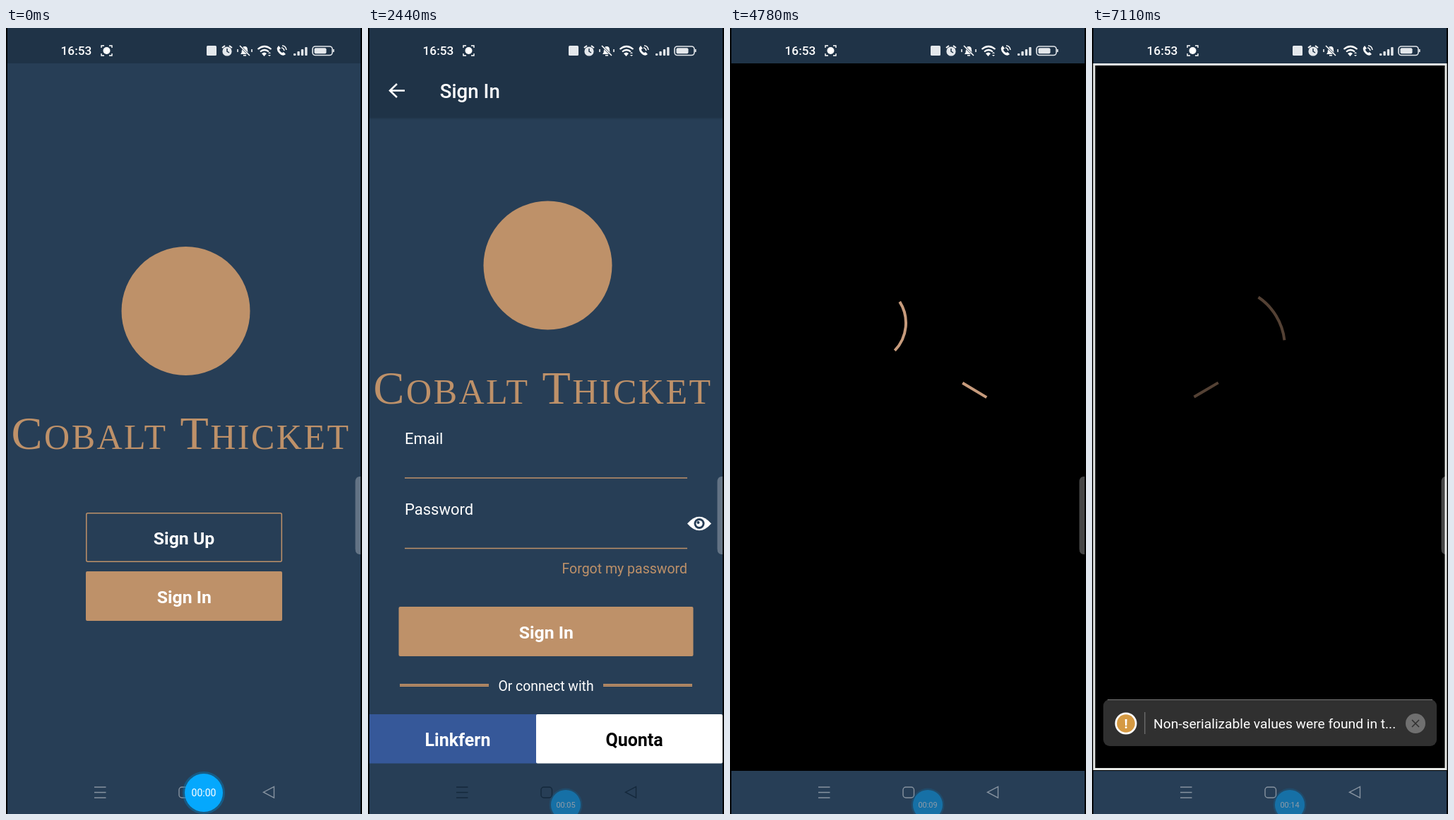
These frames come from a looping animation (504 px wide and 1111 px high, 7220 ms). An HTML page:

```html
<!DOCTYPE html>
<html lang="en">
<head>
<meta charset="utf-8">
<title>Event app</title>
<style>
  html, body { margin: 0; width: 100%; height: 100%; overflow: hidden; background: #000; }
  svg { display: block; width: 100vw; height: 100vh; font-family: Roboto, sans-serif; fill: #fff; }
  .bold { font-weight: 700; }
  .mid { text-anchor: middle; }
  .tan { fill: #be9169; }
  .line { fill: none; stroke: #be9169; }
  .white { fill: none; stroke: #fff; stroke-width: 2; }
  .book { font: 700 18px "Liberation Serif", serif; letter-spacing: .7px; }
  .brand { font: 66px "Liberation Serif", serif; letter-spacing: 2.5px; fill: #be9169; }
  .brand tspan { font-size: 50px; }
</style>
</head>
<body>
<svg id="stage" viewBox="0 0 504 1111" preserveAspectRatio="none"></svg>
<script>
const BG = '#273e56', BAR = '#1f3347', LOOP = 7220;

const rect = (x, y, w, h, fill, more = '') =>
  `<rect x="${x}" y="${y}" width="${w}" height="${h}" fill="${fill}" ${more}/>`;
const dot = (x, y, r, fill, more = '') => `<circle cx="${x}" cy="${y}" r="${r}" fill="${fill}" ${more}/>`;
const path = (d, cls = '', more = '') => `<path d="${d}" class="${cls}" ${more}/>`;
const text = (x, y, size, str, cls = '', more = '') =>
  `<text x="${x}" y="${y}" font-size="${size}" class="${cls}" ${more}>${str}</text>`;
const book = (x, y, str) => `<text x="${x}" y="${y}" class="book">${str}</text>`;
const group = (x, y, body, more = '') => `<g transform="translate(${x} ${y})" ${more}>${body}</g>`;

const brand = y => group(0, y, dot(254.5, 400, 91, '#be9169') +
  '<text x="7.5" y="595" class="brand">C<tspan>OBALT</tspan> T<tspan>HICKET</tspan></text>');

const statusBar = () => {
  const bars = [0, 1, 2, 3].map(i => rect(407 + i * 5.4, 36 - i * 3, 3.4, 3 + i * 3, '#e4e8ec', 'rx="1"')).join('');
  return text(77.5, 38, 17.3, '16:53', '', 'font-weight="500"') +
    dot(142.5, 32, 5, '#fff') +
    path('M135 28v-3h4M146 25h4v3M150 36v3h-4M139 39h-4v-3', 'white', 'style="stroke-width:1.4"') +
    rect(284, 25, 14, 14, '#e4e8ec', 'rx="1.5"') +
    dot(313, 33, 6.6, '#e4e8ec') +
    path('M313 29v4l3 2', '', `fill="none" stroke="${BAR}" stroke-width="1.5"`) +
    path('M306 28l4-3M316 25l4 3', 'white') +
    path('M332 37q2-2 2-6 0-5 4-5t4 5q0 4 2 6zM336 38h4v1.5h-4z') +
    path('M330 24l16 16', '', `stroke="${BAR}" stroke-width="3"`) +
    path('M331 25l14 14M328 30v4M348 30v4', 'white', 'style="stroke-width:1.5"') +
    path('M356.5 30q9.500-8 19 0M360 33.500q6-5 12 0', 'white', 'style="stroke-width:2.2"') +
    path('M362 36q4-3 7 0l-3.500 4zM371 36l2-2 2 2zM371 38l2 2 2-2z') +
    path('M386 25q-5 5 1 11 5 5 9 1l-3-3-2 1q-4-2-4-5l2-1z') +
    path('M390 28q3 0 4 4M391 25q5 0 6 6', 'white', 'style="stroke-width:1.5"') + bars +
    rect(434, 26, 28, 12.5, 'none', 'rx="4" stroke="#e4e8ec" stroke-width="1.6"') +
    rect(436.5, 28.3, 17, 8, '#e4e8ec', 'rx="2"') + rect(463, 30, 1.6, 4, '#e4e8ec');
};

const welcome = () => rect(2, 0, 500, 1111, BG) + rect(2, 0, 500, 50, BAR) + brand(0) +
  rect(113.8, 685.8, 276.5, 68.5, 'none', 'class="line" stroke-width="1.5" rx="2"') +
  text(252, 730, 24.8, 'Sign Up', 'bold mid') +
  rect(113, 768, 278, 70, '#be9169', 'rx="2"') +
  text(252.3, 813, 24.8, 'Sign In', 'bold mid');

const divider = 'M45 929H171M333 929H459';

const signIn = () => rect(2, 50, 500, 1061, BG) + rect(2, 50, 500, 79, '#23394f') +
  rect(2, 0, 500, 127, BAR) +
  path('M52 88.500H32M41 79l-10 9.500 10 9.500', 'white', 'style="stroke-width:2.5"') +
  text(101.8, 98.5, 27.7, 'Sign In', '', 'font-weight="500"') + brand(-64.5) +
  text(52, 588, 22, 'Email') + text(52, 688, 22, 'Password') +
  path('M52 636H452M52 735.500H452', 'line', 'stroke-width="1.6"') +
  path('M452 700.500Q469 681 486 700.500Q469 720 452 700.500Z') +
  dot(469, 700.5, 7.5, BG) + dot(469, 700.5, 4.6, '#fff') + dot(467.5, 699, 2, BG) +
  text(452, 771, 19.5, 'Forgot my password', 'tan', 'text-anchor="end"') +
  rect(43.5, 818, 417, 70, '#be9169', 'rx="2"') +
  text(252.3, 863, 24.8, 'Sign In', 'bold mid') +
  path(divider, 'line', 'stroke-width="4"') + path(divider, '', 'stroke="#8a6c55" stroke-width="1"') +
  text(252, 936.5, 19.4, 'Or connect with', 'mid') +
  rect(2, 970, 237, 69.5, '#365899') + rect(238, 970, 264, 69.5, '#fff', 'rx="2"') +
  text(127, 1015, 25, 'Linkfern', 'bold mid') +
  text(377, 1015, 25, 'Quonta', 'bold mid', 'fill="#000"');

const loader = id => rect(2, 0, 500, 50, BAR) + rect(2, 50, 500, 1000, '#000') +
  rect(2, 1050, 500, 61, BG) + `<path id="${id}" class="line" style="stroke:#c79b7c" stroke-width="4"/>`;

const warning = () =>
  rect(3, 51.5, 498, 996, 'none', 'stroke="#e9ebe9" stroke-width="3"') +
  rect(16, 949, 472, 66, '#303030', 'rx="9"') + path('M22 949.500H482', '', 'stroke="#777"') +
  dot(48, 983, 15.5, '#fff') + dot(48, 983, 12.8, '#d59a43') +
  text(48, 990, 19, '!', 'bold mid') + rect(74, 967, 1.5, 31, '#666') +
  text(87, 990, 19.2, 'Non-serializable values were found in t...') +
  dot(458, 983, 14, '#707070') +
  path('M453 978l10 10M463 978l-10 10', '', 'stroke="#303030" stroke-width="1.5"');

const icons = {
  language: path('M-10-9l9 3V10l-9-3z') +
    path('M0-7H10V8L1 6M2 4l4-9 3 9M3 1h5', 'white', 'style="stroke-width:1.7"') +
    path('M-8-2h5M-5.500-4v2q0 4-3 6M-6 0l3 4', '', 'fill="none" stroke="#182434" stroke-width="1.3"'),
  pin: path('M0 12Q-9 1-9-4A9 8 0 0 1 9-4Q9 1 0 12Z') + dot(0, -3.5, 3.2, '#182434'),
  die: path('M0-13L11-6V6L0 13-11 6V-6Z') +
    path('M0-7L7 5H-7ZM0-13V-7L-11-6-7 5-11 6M0-7L11-6 7 5 11 6M-7 5L0 13 7 5', '',
      'fill="none" stroke="#2d1c38" stroke-width="1.4"'),
  repeat: path('M-11-1A11 11 0 0 1 9-6M11 1A11 11 0 0 1-9 6M10-12v7H3M-10 12V5h7', 'white', 'style="stroke-width:1.8"'),
  calendar: rect(-10.5, -8.5, 21, 19, 'none', 'class="white" rx="1.5" style="stroke-width:2.2"') +
    rect(-11, -9, 22, 7, '#fff') + path('M-6-12v5M6-12v5', 'white', 'style="stroke-width:3"'),
  clock: dot(0, 0, 11.5, 'none', 'class="white"') + path('M0-7V0H7', 'white'),
  crown: path('M-9 6L-13-7-6 0-5-10 0-1 5-10 6 0 13-7 9 6ZM-10 8H10V12H-10Z') + dot(0, -9, 2.5, '#fff'),
  blade: path('M-22-23Q-14-12-3-4 7 3 12 12L8 15Q-2 8-11 0-21-9-22-23Z') +
    path('M5 17Q13 16 15 8M11 13l9 8', 'white', 'style="stroke-width:3"')
};
const icon = (name, x, y) => group(x, y, icons[name]);

const castleScene = () => {
  const towers = [[260, 20, 24], [239, 14, 48], [280, 13, 54], [222, 11, 58], [205, 15, 72], [298, 13, 68], [316, 13, 84]];
  const castle = towers.map(([x, w, y]) =>
    path(`M${x - w / 2} 150V${y + 26}h-2L${x} ${y}l${w / 2 + 2} 26h-2V150z`)).join('');
  let trees = '';
  for (let i = 0; i < 20; i++) {
    const x = i * 20 + 4 * Math.sin(i * 5), h = 42 + 22 * Math.sin(i * 2.3);
    const y = 196 - 38 * Math.abs(i - 9.5) / 9.5 + 10 * Math.sin(i * 4);
    trees += path(`M${24 + x} ${y - h}l10 ${h + 20}h-20z`);
  }
  const birds = [[320, 48], [338, 38], [348, 50], [330, 34]].map(([x, y]) =>
    path(`M${x - 5} ${y - 2}q4-1 5 3 2-4 6-3`, '', 'fill="none" stroke="#55394b" stroke-width="1.5"')).join('');
  return rect(24, 0, 456, 277, 'url(#sky)') + dot(254, 64, 57, '#c7a777') +
    path('M24 118Q70 80 110 105T190 110 290 100 380 88V277H24Z', '', 'fill="#665064"') +
    `<g fill="#713f4d">${castle}${rect(196, 100, 128, 50, '#713f4d')}</g>` +
    path('M260 24v-6l8 2-8 3', '', 'fill="#713f4d" stroke="#713f4d"') + birds +
    path('M24 150Q90 120 160 155T260 134 395 155V277H24Z', '', 'fill="#49304a"') +
    `<g fill="#2e2036">${trees}</g>` +
    path('M24 185Q100 200 170 230T395 175V277H24Z', '', 'fill="#21132a"') +
    path('M180 245Q235 215 300 222 260 240 310 253 240 268 180 245Z', '', 'fill="#4a3045"');
};

const card = (y, e) => group(0, y,
  rect(24, 0, 456, 277.5, '#182434') + (e.scene ? castleScene() : '') +
  path('M362.500 0H480V277.500H362.500L395 136Z', 'tan') +
  text(52, 42, 30.5, e.title, 'bold') +
  path(`M24 80H${e.tag}l-26 32.500H24Z`, 'tan') + text(39.5, 105, 22.2, e.game) +
  icon('crown', e.tag + 21, 93) +
  icon('language', 48.5, 174) + book(66, 180, 'Spanish') +
  icon(e.icon, 50, 208) + book(e.icon === 'pin' ? 70 : 68, 214, e.place) +
  icon('repeat', 50.5, 243.5) + book(70, 249, 'Daily') +
  group(e.shift, 0, icon('calendar', 235, 175) + book(254, 180, '11/20/22') +
    icon('clock', 235, 217) + book(254, 212, e.from) + book(254, 234, e.to)) +
  text(433, 50, 36, '0/5', 'bold mid') +
  icon('blade', 433, 123) + `<g transform="translate(433 123) scale(-1 1)">${icons.blade}</g>` +
  text(433, 159, 14, 'Adventure', 'mid') +
  text(426.5, 223, 19.2, e.price, 'mid') + text(426.5, 258, 27, 'Play', 'bold mid'));

const home = () => rect(2, 0, 500, 1111, BG) + rect(2, 0, 500, 50, BAR) +
  dot(78.5, 119, 48.7, '#fff') + dot(78.5, 119, 37, '#1686bd') +
  text(141, 111, 30.4, 'Welcome') + text(141, 151.5, 30.4, 'Mellow Otter') +
  path('M444 110Q449 106 449 96 449 82 461 82T473 96Q473 106 478 110Z', 'line',
    'stroke-width="4.5" stroke-linejoin="round"') +
  path('M453 113h16q-2 6-8 6t-8-6z', 'tan') +
  text(24, 243, 25, 'Your next events') +
  card(250, { title: 'ASDF', tag: 258, game: 'Cataclysm Region', icon: 'pin', place: 'Torvel, Distri...',
    shift: 0, from: '18:45hs', to: '19:45hs', price: 'Free to' }) +
  card(541.7, { title: 'HEHEE', tag: 232, game: 'Lantern Vault', icon: 'die', place: 'Toss47',
    shift: -85, from: '18:00hs', to: '19:00hs', price: 'Pay to', scene: true }) +
  text(24, 915.5, 25, 'Recommended') +
  rect(2, 973.5, 500, 7.5, 'url(#wood)') +
  path('M85 994L107.500 1012V1038H92V1026H79V1038H63V1012Z', 'tan') +
  dot(248, 1012.5, 8.5, 'none', 'class="line" stroke-width="3"') +
  path('M254 1019l10 10', 'line', 'stroke-width="3.5"') +
  path('M406.500 1030V1005H431.500V1024H412Z', 'line', 'stroke-width="3" stroke-linejoin="round"');

const $ = id => document.getElementById(id);
const scene = (id, body) => `<g id="${id}">${body}</g>`;

$('stage').innerHTML = `<defs>
  <linearGradient id="sky" x2="0" y2="1"><stop stop-color="#4c4658"/><stop offset=".5" stop-color="#92707a"/><stop offset="1" stop-color="#2a1730"/></linearGradient>
  <linearGradient id="wood"><stop stop-color="#33261f"/><stop offset=".5" stop-color="#8d6544"/><stop offset="1" stop-color="#33261f"/></linearGradient>
  </defs>` + rect(0, 0, 504, 1111, '#000') +
  scene('welcome', welcome()) + scene('signIn', signIn()) + scene('loader', loader('dashes')) +
  scene('home', home()) + scene('failed', loader('dashesAgain') + warning()) +
  statusBar() +
  path('M502 634h-1q-6.500 0-6.500 8v94q0 8 6.500 8h1z', '', 'opacity=".28"') +
  `<g id="nav" fill="none" stroke-width="1.4">` +
  path('M125 1073H141.500M125 1080.500H141.500M125 1088H141.500M379.500 1072.500V1088L364.500 1080.200Z') +
  rect(245, 1073, 15.5, 15, 'none', 'rx="4"') + '</g>' +
  scene('bubble', dot(0, 0, 30, '#087dba', 'opacity=".45"') + dot(0, 0, 27, '#05a8fd') +
    text(0, 5, 14, '', 'mid', 'id="timer"'));

const clamp = v => Math.max(0, Math.min(1, v));
const mix = (a, b, u) => a + (b - a) * u;
const show = (id, on) => $(id).style.display = on ? '' : 'none';

// Point on an ellipse at an angle in degrees
const orbit = (cx, cy, rx, ry, a) =>
  `${cx + rx * Math.cos(a * Math.PI / 180)} ${cy + ry * Math.sin(a * Math.PI / 180)}`;

// A bent dash swings while a straight one circles below it
function spin(id, ms) {
  const p = Math.max(0, ms / 1890), u = (1 - Math.cos(3 * Math.PI * p)) / 2;
  const r = mix(85, 56, u), turn = 442.4 * p;
  const bent = a => orbit(mix(188, 193, u), mix(451, 417, u), r, r, a);
  const straight = a => orbit(253.5, 583, 142, 96, a + turn);
  $(id).setAttribute('d',
    `M${bent(mix(-56, -32.5, u))}A${r} ${r} 0 0 1 ${bent(mix(-6.6, 44, u))}` +
    `M${straight(219.6)}L${straight(238)}`);
  $(id).style.opacity = clamp(.42 + ms / 600);
}

function draw(t) {
  const enter = clamp((t - 560) / 120);
  show('signIn', enter > 0 && t < 2670);
  show('loader', t >= 2670 && t < 5110);
  show('home', t >= 5110 && t < 7110);
  show('failed', t >= 7110);
  $('signIn').style.opacity = enter;
  $('signIn').setAttribute('transform', `translate(0 ${40 * (1 - enter) ** 2})`);
  show('dashes', t >= 2780);
  spin('dashes', t - 2890);
  spin('dashesAgain', t - 7110);

  const darkNav = t >= 1780 && t < 2560;
  $('nav').setAttribute('stroke', darkNav ? '#14283b' : '#8793a0');

  const dock = clamp((t - 1670) / 230), ease = dock * dock * (3 - 2 * dock);
  const settle = clamp((t - 110) / 300);
  $('bubble').setAttribute('transform',
    `translate(280 ${mix(1081, 1098, ease)}) scale(${mix(1 - .04 * settle, .78, ease)})`);
  $('bubble').style.opacity = mix(1, .48, ease);
  const seconds = Math.floor((t + 190) / 500);
  $('timer').textContent = '00:' + String(seconds).padStart(2, '0');
}

const start = performance.now();
function frame() {
  draw((performance.now() - start) % LOOP);
  requestAnimationFrame(frame);
}
frame();
</script>
</body>
</html>
```
